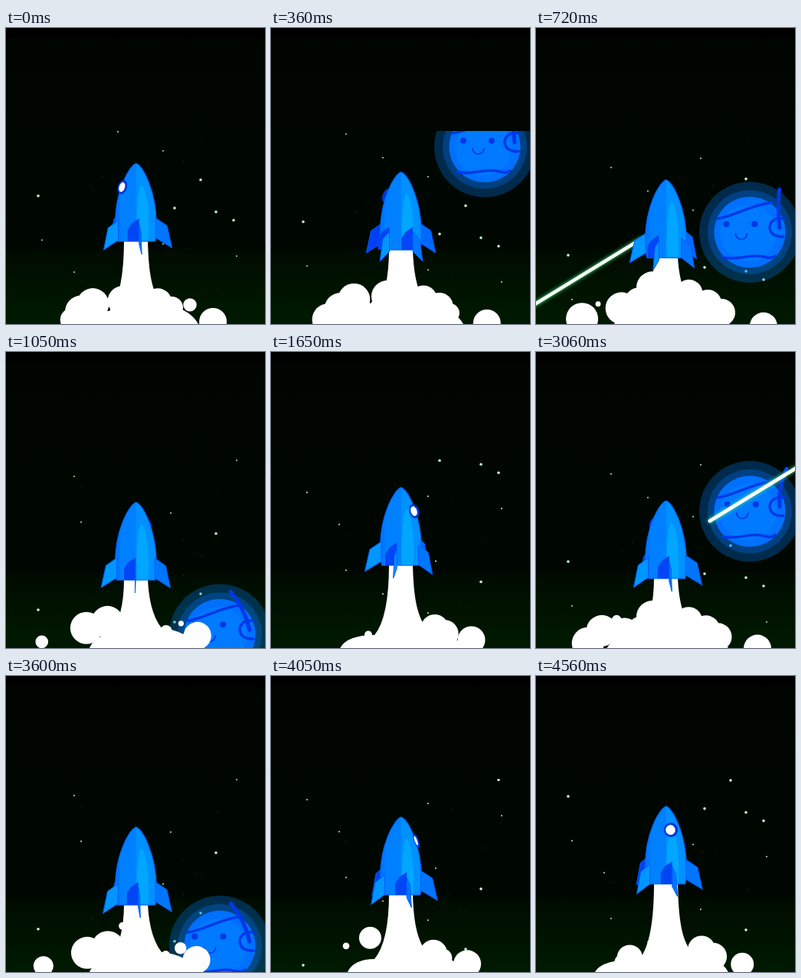
An HTML page with a canvas for the animation above (4.59 s loop, 338 by 388 pixels).

```html
<!DOCTYPE html>
<html lang="en">
<head>
<meta charset="utf-8">
<title>Rocket flight</title>
<style>
html, body { margin: 0; height: 100%; overflow: hidden; background: #000; }
canvas { display: block; }
</style>
</head>
<body>
<canvas id="stage" width="338" height="388"></canvas>
<script>
const ctx = document.getElementById('stage').getContext('2d');
const { sin, cos, min, abs, floor, PI } = Math;
const TAU = 2 * PI, LOOP = 4590, STEP = 30, TOP = 135;
const STAR_SPAN = 275, PLANET_SPAN = 702, FINS = 5, PUFF_LIFE = .62;

// Star travel over time, [ms, px]: a slow start, then steady
const travel = [[0, 0], [360, 34], [1050, 118], [LOOP, 491]];

const brightStars = [[254, 199], [42, 220], [297, 252], [274, 395], [220, 236], [274, 241]];
const softStars = [[205, 161], [146, 136], [205, 283], [301, 299], [89, 320], [98, 380], [215, 368], [47, 278]];
let seed = 7;
const random = () => (seed = seed * 16807 % 2147483647) / 2147483647;
const dimStars = Array.from({ length: 10 }, () => [338 * random(), STAR_SPAN * random()]);

// Each puff: birth phase and how far from the plume it drifts
const leftPuffs = [[.61, 48], [.68, 72], [.85, 109], [.98, 55], [.03, 24], [.81, 0]];
const rightPuffs = [[.34, 25], [.78, 5], [.83, 34], [.98, 64], [.78, 113], [.24, 80], [.43, 47]];

const wrap = (v, n) => ((v % n) + n) % n;
const mix = (a, b, u) => a + (b - a) * u;

function distanceAt(t) {
  const i = travel.findIndex(k => k[0] > t);
  const [t0, d0] = travel[i - 1], [t1, d1] = travel[i];
  return mix(d0, d1, (t - t0) / (t1 - t0));
}

function oval(x, y, rx, color, ry = rx, tilt = 0) {
  ctx.fillStyle = color;
  ctx.beginPath();
  ctx.ellipse(x, y, rx, ry, tilt, 0, TAU);
  ctx.fill();
}

function shape(path, color) {
  ctx.fillStyle = color;
  ctx.fill(new Path2D(path));
}

function line(path, color, width) {
  ctx.strokeStyle = color;
  ctx.lineWidth = width;
  ctx.stroke(new Path2D(path));
}

function background() {
  const g = ctx.createLinearGradient(0, 0, 0, 388);
  [[0, '#000'], [.03, '#000'], [.04, '#000500'], [.74, '#000700'], [.76, '#000c00'], [1, '#001a00']]
    .forEach(s => g.addColorStop(...s));
  ctx.fillStyle = g;
  ctx.fillRect(0, 0, 338, 388);
}

function stars(list, radius, color, d) {
  for (const [x, y] of list) oval(x, TOP + wrap(y + d - TOP, STAR_SPAN), radius, color);
}

function planet(p) {
  ctx.save();
  ctx.translate(279, 69 + PLANET_SPAN * p);
  ctx.lineCap = 'round';
  oval(0, 0, 66, 'rgba(0,115,230,.33)');
  oval(0, 0, 55, 'rgba(0,115,255,.3)');
  oval(0, 0, 46.5, '#0070ff');
  oval(-2, 1, 37, '#007aff');
  const ink = '#0038e8', turn = -16 * (p - .124);
  line('M-42 -18 C-22 -20 -2 -35 29 -39', ink, 3.5);
  line('M-36 33 C-20 37 -8 31 8 31 S24 37 33 31', ink, 3.5);
  line('M45 -18 H36 Q26 -15 26 -6 Q27 6 44 6', ink, 3.5);
  oval(-28 + turn, -8 + turn, 4, ink);
  oval(9 + turn, -8 + turn, 4, ink);
  line(`M${turn - 16} 2 a7.5 7.5 0 0 0 15 0`, ink, 1.7);
  const wave = cos((p - .207) / .215 * PI);
  line(`M39 -6 Q${35 + 2 * wave} -33 ${31 + 17 * wave} -56`, ink, 5);
  ctx.restore();
}

function meteor(p) {
  const u = (p - .165) / .042;
  if (u < 0 || u > 4) return;
  const head = 345 - 145 * u, tail = min(345, head + 200), y = x => 238 - (x - 200) * .616;
  ctx.save();
  ctx.lineCap = 'round';
  ctx.shadowColor = '#4f8';
  ctx.shadowBlur = 5;
  line(`M${head} ${y(head)} L${tail} ${y(tail)}`, '#fff', 4.5);
  ctx.restore();
}

// Puffs slide outward, rise (less when farther out), then shrink away
function puffs(list, side, x, rise, size, p) {
  for (const [birth, reach] of list) {
    const u = wrap(p - birth, 1) / PUFF_LIFE;
    if (u > 1) continue;
    const y = mix(361 + .2 * reach, rise + .5 * reach, u * u);
    oval(x + side * reach * mix(.48, 1, u), y, size * min(1, 3 * u, 6 * (1 - u)), '#fff');
  }
}

function smoke(p, tail) {
  const edge = 88 - 20 * cos(TAU * (p - .92));
  shape(`M154 ${tail} H185 C186 320 190 345 203 362 Q240 366 252 390 H${edge}
    Q${edge + 8} 371 135 371 Q154 348 154 ${tail}Z`, '#fff');
  puffs(leftPuffs, -1, 152, 325, 21, p);
  puffs(rightPuffs, 1, 195, 338, 18, p);
}

function fin(angle) {
  const s = sin(angle), c = cos(angle), x = 26 * s;
  if (c > .75) shape(`M${x} 72 L${x - 10} 79 L${x - 15} 87 V102 H${x}Z`, '#0046f5');
  const outline = [[26, 70], [41, 80], [47.5, 109], [26, 96]].map(([r, y]) => [r * s, y + 10 * c]);
  const path = `M${outline.join('L')}Z`;
  const color = c < -.1 ? (s < 0 ? '#0040f5' : '#0068ff') : s < -.2 ? '#0096ff' : '#0076ff';
  shape(path, color);
  line(path, '#005cff', 1);
}

function porthole(angle) {
  const c = cos(angle), s = sin(angle), x = 20 * s, tilt = -.35 * s;
  oval(x, 31, 3 + 6.5 * abs(c), '#0038d8', 9.5, tilt);
  if (c > 0) oval(x - .5, 31, 1.5 + 5 * c, '#fff', 6.5, tilt);
}

function rocket(spin, nose) {
  const fins = Array.from({ length: FINS }, (_, i) => spin + i * TAU / FINS);
  const hull = 'M0 0 C-9 3 -27 36 -27 78 Q-27 92 -25 102 H25 Q27 92 26.5 78 C26 36 9 3 0 0Z';
  ctx.save();
  ctx.translate(169.7, nose);
  ctx.lineJoin = 'round';
  fins.filter(a => cos(a) < 0).forEach(fin);
  if (cos(spin) < 0) porthole(spin);
  shape(hull, '#0080ff');
  ctx.save();
  ctx.clip(new Path2D(hull));
  ctx.fillStyle = '#0076ff';
  ctx.fillRect(-30, 0, 9, 110);
  ctx.fillStyle = '#0090ff';
  ctx.fillRect(0, 0, 30, 110);
  shape('M1 103 C0 70 2 32 7 28 C14 32 18 70 16 103Z', '#00a6ff');
  ctx.restore();
  line(hull, '#0064ff', 1.2);
  if (cos(spin) >= 0) porthole(spin);
  fins.filter(a => cos(a) >= 0).forEach(fin);
  ctx.restore();
}

function draw(now) {
  const t = floor(now % LOOP / STEP) * STEP;
  const d = distanceAt(t), p = wrap(d / STAR_SPAN, 1);
  const nose = 184.8 + 15 * cos(TAU * (p - .33));

  background();
  ctx.save();
  ctx.beginPath();
  ctx.rect(0, TOP, 338, 388 - TOP);
  ctx.clip();
  stars(dimStars, .7, '#17401f', d);
  stars(softStars, 1.1, '#93dc9c', d);
  stars(brightStars, 1.8, '#c4ffcc', d);
  planet(p);
  meteor(p);
  smoke(p, nose + 100);
  rocket(-TAU * (p - .825), nose);
  ctx.restore();
}

const start = performance.now();
function frame() {
  draw(performance.now() - start);
  requestAnimationFrame(frame);
}
frame();
</script>
</body>
</html>
```
